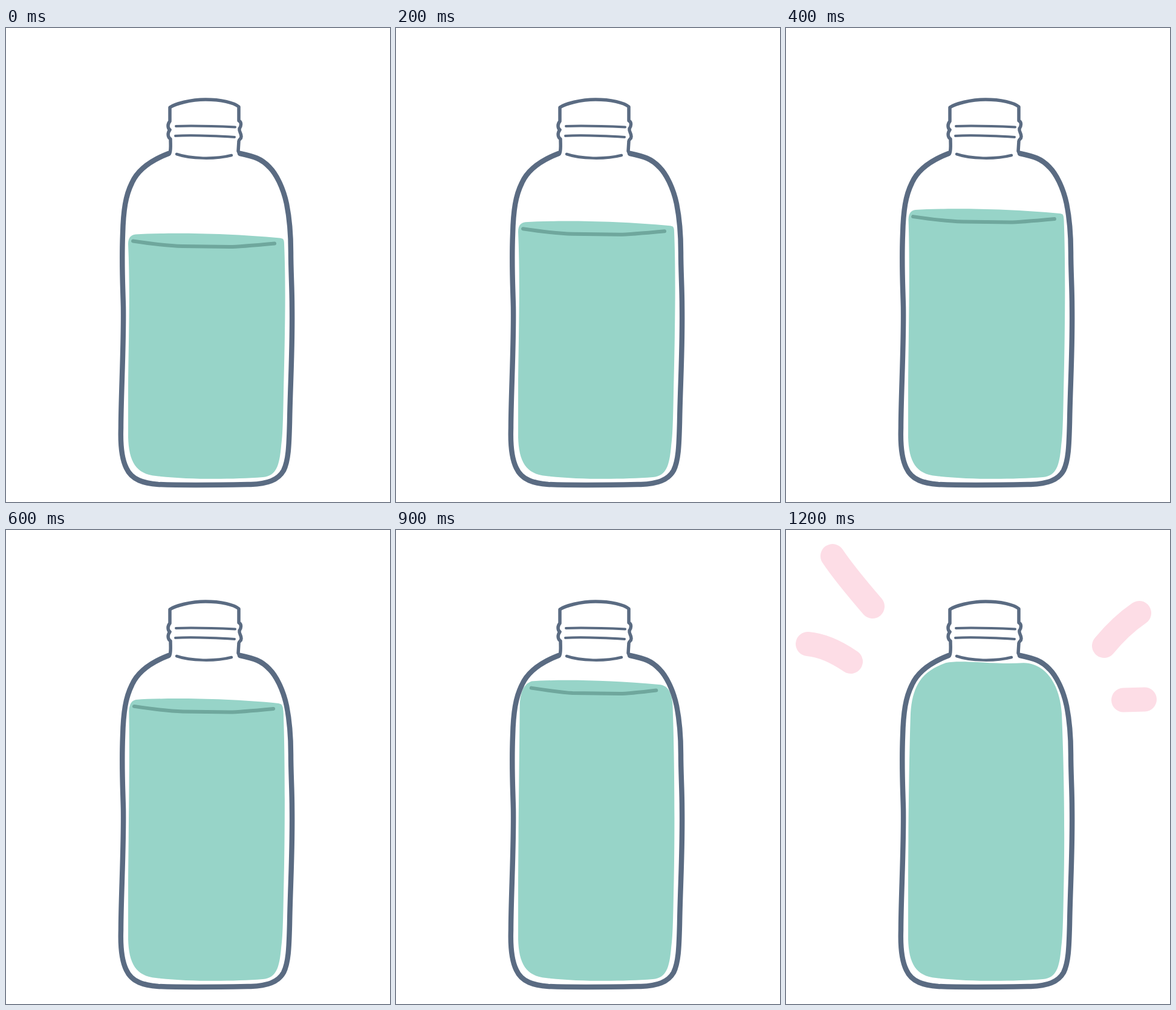
Write an HTML page that moves like this. It is 635 px wide and 782 px high and loops after 1.7 s.

```html
<!DOCTYPE html>
<html lang="en">
<head>
<meta charset="utf-8">
<title>Filling bottle</title>
<style>
  html, body { margin: 0; width: 100%; height: 100%; overflow: hidden; background: #fff; }
  svg { display: block; width: 100%; height: 100%; }
  path { fill: none; stroke-linecap: round; stroke-linejoin: round; }
  #bottle { stroke: #5a6b82; }
  #sparks { stroke: #fddde6; stroke-width: 40; }
  #liquid { fill: #97d4c8; }
  #ripple { stroke: #6fa79d; stroke-width: 6; }
</style>
</head>
<body>
<svg viewBox="0 0 635 782">
  <g id="sparks">
    <path d="M77 43C95 70 118 97 143 126"/>
    <path d="M36 188C60 190 85 202 107 217"/>
    <path d="M526 191C545 168 562 152 584 137"/>
    <path d="M558 280.5L593 279.5"/>
  </g>
  <path id="liquid"/>
  <path id="ripple"/>
  <g id="bottle">
    <path stroke-width="8.5" d="M269 207C243 217 218 233 208 256C198 276 194 300 193 340
      C191 390 193 420 194 460C195 520 190 610 190 660C189 690 192 712 199 726
      C208 746 228 751 252 753C300 755 350 754 405 753C432 752 450 746 459 730
      C467 714 468 690 469 650C470 590 474 530 473 460C473 430 471 400 471 370
      C471 340 468 310 464 290C458 262 446 240 436 230C422 215 410 212 387 207"/>
    <path stroke-width="5.5" d="M271 206C273 200 272 192 272 183C267 180 267 173 271 168
      C267 165 267 158 271 154L271 131C280 125 305 118 330 118C355 118 377 123 385 130
      L385 153C390 155 389 162 386 166C385 171 389 173 389 179C389 184 385 183 385 187
      L384 203Q385 207 390 207"/>
    <path stroke-width="4" d="M281 162C310 161 345 162 379 163.5M280 178C312 176 345 178 378 180"/>
    <path stroke-width="4.5" d="M282 208C305 216 345 217 373 210"/>
  </g>
</svg>
<script>
const STEP = 100, LOOP = 1700, LAST = 12;
const LOW = 338.5, RISE = 10.1;           // first level, rise per step
const SHOULDER = 310, FULL = LOW - RISE * LAST;

const $ = id => document.getElementById(id);
const mix = (a, b, k) => a + (b - a) * k;

// 0 while the surface lies between straight walls, 1 at the neck.
const narrowing = y => Math.max(0, (SHOULDER - y) / (SHOULDER - FULL));

function liquidPath(y, u) {
  const left = 202 + 4 * u, right = 460 - 4 * u;
  const topLeft = 214 + 50 * u ** 4, topRight = 453 - 60 * u ** 3;
  const rightY = y + 8 - 6 * u ** 6;
  const drop = 18 + 68 * u ** 3;          // height of the rounded corners
  const dip = 6 * u ** 6;
  const edge = y + drop;
  return `M${left} ${edge}` +
    `C${left + 3 * u} ${y + 0.36 * drop} ${mix(left, topLeft, 0.45)} ${y + 0.16 * drop} ${topLeft} ${y + 2}` +
    `C${mix(topLeft, topRight, 0.2)} ${y - 1 - dip / 2} ${mix(topLeft, topRight, 0.6)} ${y - 1 + dip} ${topRight} ${rightY}` +
    `C${mix(topRight, right, 0.62)} ${rightY + 1} ${right - 3 * u} ${y + 0.47 * drop} ${right} ${edge}` +
    `C${right + 2.5} ${edge + 60} 462 480 459 600` +
    'C458 660 457 675 455 690C452 722 447 739 425 741' +
    'C370 745 300 745 248 739C215 736 203 715 202 675L202 600' +
    `C202 530 ${206 - 3 * u} ${edge + 90} ${left} ${edge}Z`;
}

function ripplePath(y, u) {
  const inset = 45 * u ** 3;
  const left = 210 + inset, right = 444 - inset;
  return `M${left} ${y + 13}Q${left + 50} ${y + 20.5} 292 ${y + 21.5}` +
    `L370 ${y + 22.5}Q385 ${y + 22.5} ${right} ${y + 17}`;
}

function draw(ms) {
  const step = Math.min(LAST, Math.floor(ms / STEP));
  const level = LOW - RISE * step;
  const u = narrowing(level);
  $('liquid').setAttribute('d', liquidPath(level, u));
  $('ripple').setAttribute('d', ripplePath(level, u));
  $('ripple').style.display = step < LAST - 1 ? '' : 'none';
  $('sparks').style.display = step === LAST ? '' : 'none';
}

const start = performance.now();
function tick() {
  draw((performance.now() - start) % LOOP);
  requestAnimationFrame(tick);
}
tick();
</script>
</body>
</html>
```
